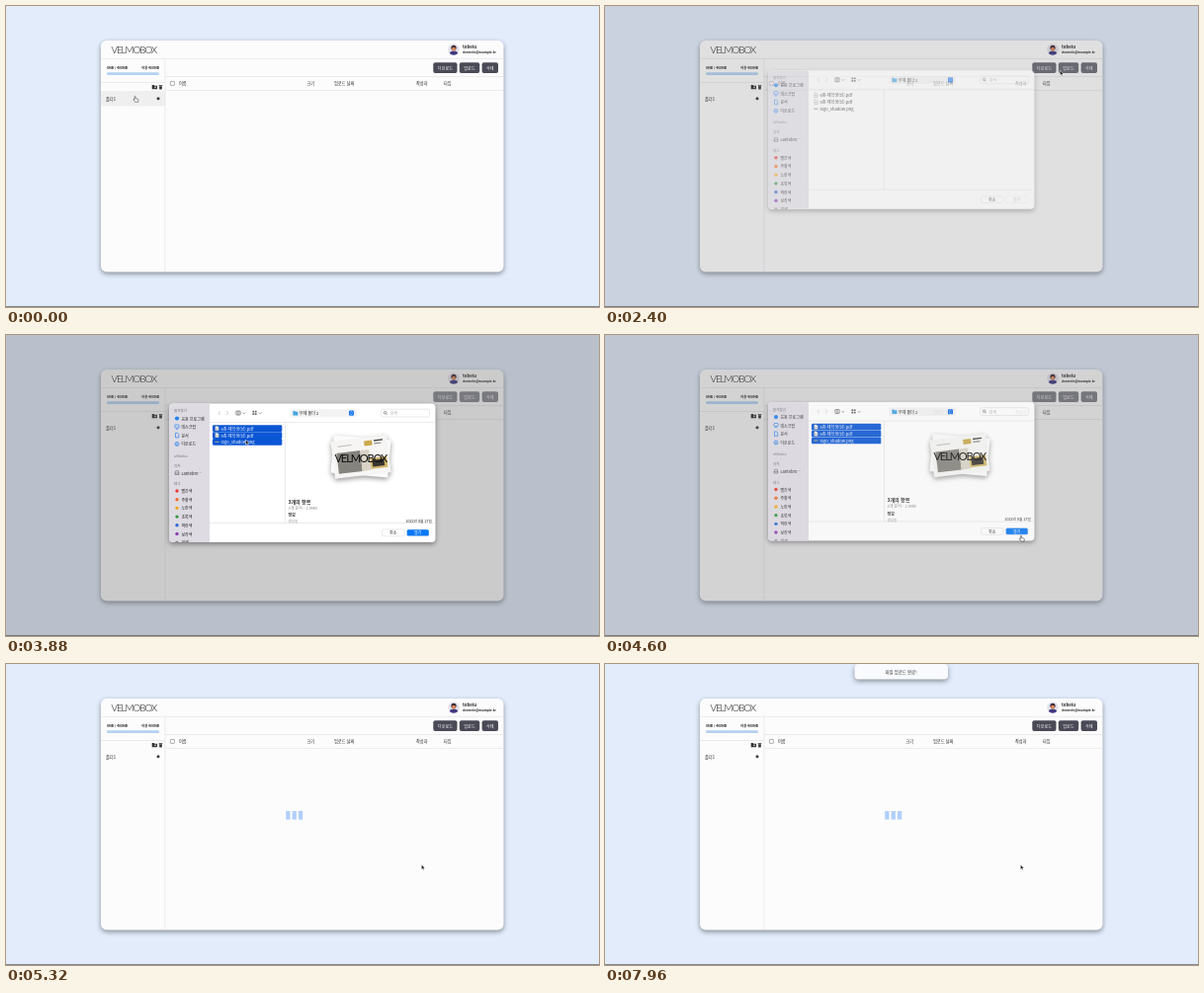
Animation of 600x305 px, one loop 8000 ms. Source, as an HTML page:

```html
<!DOCTYPE html>
<html lang="ko">
<head>
<meta charset="utf-8">
<title>파일 업로드</title>
<style>
  html, body { margin: 0; width: 100%; height: 100%; overflow: hidden; background: #e2ecfb; }
  svg { display: block; width: 100vw; height: 100vh; }
  text { font-family: "Noto Sans CJK KR", "Noto Sans CJK", "Noto Sans", sans-serif; dominant-baseline: central; }
  .brand { font-family: Lato, "Open Sans", sans-serif; font-weight: 300; }
  .shadow { filter: drop-shadow(0 2px 2.5px rgba(0, 0, 0, .4)); }
</style>
</head>
<body>
<svg id="stage" viewBox="0 0 600 305"></svg>
<script>
const LOOP = 8000;
const BRAND = 'VELMOBOX';

// Markup helpers
const text = (x, y, s, size = 4.2, fill = '#222', more = '') =>
  `<text x="${x}" y="${y}" font-size="${size}" fill="${fill}" ${more}>${s}</text>`;
const rect = (x, y, w, h, fill, r = 0, more = '') =>
  `<rect x="${x}" y="${y}" width="${w}" height="${h}" rx="${r}" fill="${fill}" ${more}/>`;
const dot = (x, y, r, fill, more = '') => `<circle cx="${x}" cy="${y}" r="${r}" fill="${fill}" ${more}/>`;
const line = (d, color = '#e4e4e8', w = .7) =>
  `<path d="${d}" fill="none" stroke="${color}" stroke-width="${w}"/>`;
const bold = 'font-weight="700"', middle = 'text-anchor="middle"', end = 'text-anchor="end"';

const button = (x, w, label) =>
  rect(x, 57.2, w, 10.8, '#4a4a57', 2) + text(x + w / 2, 62.6, label, 4.1, '#fff', middle);

const page = `
  ${rect(0, 0, 600, 305, '#e2ecfb')}
  ${rect(0, 304.2, 600, .8, '#6d727b')}
  ${rect(96, 35, 407.5, 234.5, '#fcfcfd', 6, 'class="shadow"')}
  <g id="row">${rect(96, 86, 65, 15.5, '#efefef')}</g>
  ${line('M96 53.4H503.5M161 53.4V269.5M96 77.5H161M161 71.5H503.5M161 85.5H503.5')}
  ${text(106.5, 44, BRAND, 9.8, '#111', 'class="brand" letter-spacing="-1"')}
  ${dot(453, 44, 5.8, '#e3e1ea')}
  <path d="M448.8 48q.6-2.6 4.2-2.6t4.2 2.6q-1.6 1.8-4.2 1.8t-4.2-1.8z" fill="#3f3a80"/>
  ${dot(453, 42.3, 2.6, '#3a2733')}${dot(453, 43.7, 1.9, '#e08a5c')}
  ${text(462, 41.3, 'tobelu', 4.4, '#222', bold)}
  ${text(462, 46.7, 'dormelis@example.kr', 3.1, '#222', bold)}
  ${text(102, 62, '0MB / 400MB', 3.3, '#222', bold)}
  ${text(155, 62, '허용 400MB', 3.3, '#222', bold + end)}
  ${rect(102, 67.2, 53, 2.8, '#b4d2f2', 1.2)}
  <path d="M147.7 80h2l.6.7h2.7v3.6h-5.3z" fill="#333"/>
  ${line('M151 81.4v2M150 82.4h2', '#fff', .5)}
  <path d="M154.7 80h3.6v.7h-3.6zM155 81.2h3l-.3 3.2h-2.4z" fill="#333"/>
  ${text(101, 93.8, '폴더1')}
  ${dot(154, 93.8, 1.5, '#333')}${dot(154, 93.8, .4, '#aaa')}
  <g id="buttons">
    ${button(432.3, 24.2, '다운로드')}${button(458.8, 20.4, '업로드')}${button(481.6, 16.4, '삭제')}
  </g>
  ${rect(166.4, 76.4, 4, 4, '#fff', .6, 'stroke="#777" stroke-width=".6"')}
  ${[[175, '이름'], [304.5, '크기'], [332, '업로드 날짜'], [415, '작성자'], [443, '타입']]
    .map(([x, s]) => text(x, 78.4, s)).join('')}`;

const spinner = `<g id="spinner" fill="#b0cffa">${[0, 1, 2]
  .map(i => `<rect class="bar" x="${283.2 + 6.4 * i}" width="4.27"/>`).join('')}</g>`;

const blue = '#2480ee', sideGrey = '#97929d';
const places = [['응용 프로그램', 84.5], ['데스크탑', 93], ['문서', 101.6], ['다운로드', 110.4], ['Lantebro…', 139.5]];
const tags = [['빨간색', '#e63b32'], ['주황색', '#f36c2b'], ['노란색', '#f5a81f'], ['초록색', '#35963c'],
  ['파란색', '#2b6bd2'], ['보라색', '#8b3fb2'], ['회색', '#8a8a8e']];
const files = ['6종-재학생(남).pdf', '9종-재학생(남).pdf', 'logo_shadow.png'];

const sidebar = `
  ${rect(165, 69.5, 41, 140.5, '#dedbe3')}
  ${[['즐겨찾기', 76.8], ['oNimbo', 122], ['위치', 132], ['태그', 150.6]]
    .map(([s, y]) => text(170, y, s, 3.5, sideGrey, bold)).join('')}
  ${places.map(([s, y]) => text(177.4, y, s, 4)).join('')}
  ${dot(173, 84.5, 2.1, blue)}
  ${rect(170.9, 91, 4.2, 3, 'none', .5, `stroke="${blue}" stroke-width=".7"`)}${line('M171.8 95.2h2.4', blue)}
  <path d="M171.5 99.3h2l1.2 1.2v3.4h-3.2z" fill="none" stroke="${blue}" stroke-width=".7"/>
  ${dot(173, 110.4, 2, 'none', `stroke="${blue}" stroke-width=".7"`)}
  ${line('M173 109v2.6M172 110.7l1 1 1-1', blue, .6)}
  <path d="M171 140l.8-2.3h2.4l.8 2.3v1.5h-4zM171 140h4" fill="none" stroke="#66626c" stroke-width=".6"/>
  ${tags.map(([s, c], i) => dot(173, 158 + 8.7 * i, 1.7, c) + text(177.4, 158 + 8.7 * i, s, 4)).join('')}`;

const toolbar = `
  ${line('M206 88.6H434.5M206 190.5H434.5M282.5 88.6V190.5', '#e2e2e2')}
  ${line('M217 77l-2 2 2 2M223 77l2 2-2 2', '#c4c4c4')}
  ${rect(232.8, 77, 4.4, 4, 'none', .5, 'stroke="#555" stroke-width=".6"')}
  ${line('M234.3 77v4M235.8 77v4', '#555', .5)}
  ${[0, 1, 2, 3].map(i => rect(249.4 + i % 2 * 2.4, 76.8 + (i >> 1) * 2.4, 1.8, 1.8, '#666', .3)).join('')}
  ${line('M239.6 78.6l1.2 1.2 1.2-1.2M256 78.6l1.2 1.2 1.2-1.2', '#555', .6)}
  ${rect(287.3, 75, 67.5, 8.2, '#f3f3f3', 1.8)}
  <path d="M290.4 77h2l.6.7h2.4v3.8h-5z" fill="#43a5e2"/>
  ${text(297, 79, '무제 폴더 2', 4)}
  ${rect(347, 76.4, 5, 5.4, '#1877f2', 1.2)}${line('M348.4 78.4l1.1-1 1.1 1M348.4 79.8l1.1 1 1.1-1', '#fff', .5)}
  ${rect(379.6, 75.2, 49, 7.8, '#fff', 1.6, 'stroke="#dcdcdc" stroke-width=".6"')}
  ${dot(383.6, 78.7, 1.3, 'none', 'stroke="#555" stroke-width=".6"')}${line('M384.6 79.7l1.2 1.2', '#555', .6)}
  ${text(388.6, 79, '검색', 4, '#aaa')}`;

const fileRow = (name, i) => {
  const y = 94.6 + 6.9 * i;
  const icon = i < 2
    ? `<path d="M211.8 ${y - 2.2}h2.2l1.2 1.2v3.2h-3.4z" fill="#fff" stroke="#999" stroke-width=".5"/>` + rect(212.4, y, 2, .8, '#888')
    : rect(211.3, y - .6, 4.2, 1.2, '#999');
  return `<g class="file">${rect(209, y - 3.3, 70.3, 6.7, '#0b56d5', 1.2, 'class="mark"')}${icon}${text(217.4, y, name, 4.1)}</g>`;
};

const preview = `<g id="preview">
  <g class="shadow">
    ${rect(330, 104, 58, 38, '#fbfbfb', 0, 'transform="rotate(5 359 123)"')}
    <g transform="rotate(-7 359 123.5)">
      ${rect(330.5, 104.5, 57, 38, '#f6f5f3')}
      ${rect(335, 117, 24, 21, '#85837d')}
      ${rect(359, 117, 9, 21, '#d9d4c6')}
      ${rect(368, 126, 17, 11, '#cfb56a')}
      ${rect(370, 128, 12, 7, '#37352f')}
      ${rect(364, 108, 8, 5, '#c9a94c')}${rect(374, 108, 9, 1.4, '#444')}${rect(374, 111, 7, 1.2, '#888')}
      ${rect(337, 110, 14, 1, '#bbb')}
    </g>
  </g>
  ${text(332.5, 124.3, BRAND, 11.2, '#111', 'class="brand" letter-spacing="-1.2" style="font-weight:400"')}
  ${text(285.5, 168, '3개의 항목', 5, '#222', bold)}
  ${text(285.5, 174.6, '3개 문서 - 2.9MB', 4, '#888')}
  ${text(285.5, 182, '정보', 4, '#222', bold)}
  ${text(285.5, 188.6, '생성일', 3.5, '#888')}
  ${text(431, 188.4, '2022년 8월 27일', 3.7, '#222', 'font-weight="500"' + end)}
</g>`;

const dialog = `<g id="dialog">
  ${rect(165, 69.5, 269.5, 140.5, '#fff', 4, 'class="shadow"')}
  <g clip-path="url(#sheet)">
    ${sidebar}${toolbar}${files.map(fileRow).join('')}${preview}
  </g>
  ${rect(380.5, 197, 22.5, 6.8, '#fff', 1.6, 'stroke="#ddd" stroke-width=".6"')}
  ${text(391.7, 200.3, '취소', 4, '#222', middle)}
  ${rect(405.5, 197, 22.5, 6.8, '#fff', 1.6, 'id="open" stroke="#e6e6e6" stroke-width=".5"')}
  ${text(416.7, 200.3, '열기', 4, '#bbb', middle + ' id="openLabel"')}
</g>`;

const toast = `<g id="toast">${rect(252.5, 0, 94.5, 15.5, '#f8fafd', 4, 'class="shadow"')}
  ${text(299.5, 8, '파일 업로드 완료!', 4.4, '#333', middle)}</g>`;

const cursor = `<g id="cursor" stroke="#fff" stroke-width=".5" stroke-linejoin="round">
  <path id="arrow" d="M0 0V5l1.1-1 .8 1.8.9-.4-.8-1.7h1.5z" fill="#111"/>
  <path id="hand" d="M0 .4q.6-.8 1.1 0v2l2.4.6q.6.2.5 1l-.4 1.8H.6L-1.1 3.5q0-.8.7-.5l.4.4z" fill="#fff" stroke="#222"/>
</g>`;

document.getElementById('stage').innerHTML =
  `<clipPath id="sheet">${rect(165, 69.5, 269.5, 140.5, '#fff', 4)}</clipPath>` +
  page + spinner + rect(0, 0, 600, 305, '#5a5a5a', 0, 'id="dim"') + dialog + toast + cursor;

// Motion helpers
const $ = id => document.getElementById(id);
const set = (el, attrs) => { for (const k in attrs) el.setAttribute(k, attrs[k]); };
const show = (el, on) => set(el, { visibility: on ? 'inherit' : 'hidden' });
const ramp = (t, a, b) => Math.min(1, Math.max(0, (t - a) / (b - a)));
const smooth = p => p * p * (3 - 2 * p);

const path = [[40, 130, 91.4], [240, 214, 113], [880, 214, 113], [1640, 463.5, 64.8], [1720, 463.5, 64.8],
  [1840, 464.8, 64.6], [2360, 464.8, 64.6], [2840, 250.8, 94.6], [3040, 250.8, 94.6], [3420, 242.5, 106],
  [3940, 242.5, 106], [4440, 418, 200], [4560, 420.4, 203.2]];

function cursorAt(t) {
  const i = path.findIndex(p => p[0] > t);
  if (i < 1) return path[i ? path.length - 1 : 0].slice(1);
  const [a, x, y] = path[i - 1], [b, u, v] = path[i], p = smooth(ramp(t, a, b));
  return [x + (u - x) * p, y + (v - y) * p];
}

// cubic-bezier(0, .5, .5, 1)
function settle(x) {
  let lo = 0, hi = 1;
  for (let i = 0; i < 16; i++) {
    const s = (lo + hi) / 2;
    if (1.5 * s * s * (1 - s) + s ** 3 < x) lo = s; else hi = s;
  }
  return 1.5 * lo * (1 - lo) ** 2 + 3 * lo * lo * (1 - lo) + lo ** 3;
}

const bars = document.querySelectorAll('.bar');
const rows = [...document.querySelectorAll('.file')].map(g => [g.querySelector('.mark'), g.querySelector('text')]);
const picked = [3040, 3220, 3380];

function draw(t) {
  set($('row'), { opacity: 1 - ramp(t, 80, 240) });

  const k = ramp(t, 2240, 2520) * (1 - ramp(t, 4560, 4840));
  set($('dim'), { opacity: .3 * k });
  set($('buttons'), { opacity: 1 - .35 * k });
  set($('dialog'), { opacity: k, transform: `translate(0 ${-10 * (1 - k)})` });
  show($('dialog'), k > 0);

  rows.forEach(([mark, label], i) => {
    const on = t >= picked[i];
    show(mark, on);
    set(label, { fill: on ? '#fff' : '#222' });
  });
  const ready = t >= picked[0];
  set($('open'), { fill: ready ? '#0a78f5' : '#fff' });
  set($('openLabel'), { fill: ready ? '#fff' : '#bbb' });
  show($('preview'), t >= 3440);

  show($('spinner'), t >= 4900);
  bars.forEach((bar, i) => {
    const phase = (t - 4620 - 120 * i + 2 * LOOP * 1.2) % 1200;
    const h = 8.53 * (2 - settle(Math.min(1, phase / 600)));
    set(bar, { y: 153.3 - h / 2, height: h });
  });

  show($('toast'), t >= 7860);
  set($('toast'), { transform: `translate(0 ${-15.5 * (1 - ramp(t, 7860, 7960))})` });

  set($('cursor'), { transform: `translate(${cursorAt(t)})` });
  const hand = t < 120 || (t > 1560 && t < 2400) || (t > 4600 && t < 5000);
  show($('hand'), hand);
  show($('arrow'), !hand);
}

const start = performance.now();
(function tick() {
  draw((performance.now() - start) % LOOP);
  requestAnimationFrame(tick);
})();
</script>
</body>
</html>
```
